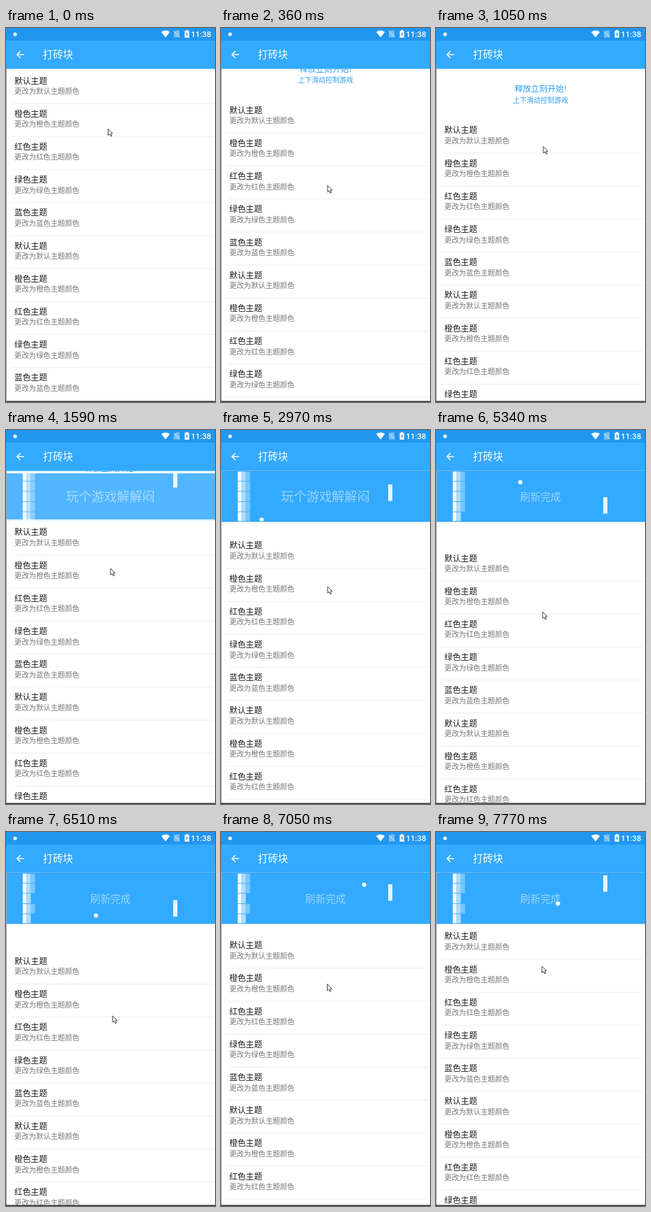
An HTML page with a canvas for the animation above (7.8 s loop, 300x535 px).

```html
<!DOCTYPE html>
<html lang="zh-CN">
<head>
<meta charset="utf-8">
<title>打砖块</title>
<style>
html, body { margin: 0; width: 100%; height: 100%; overflow: hidden; background: #fff; }
canvas { display: block; width: 300px; height: 535px; }
</style>
</head>
<body>
<canvas id="stage"></canvas>
<script>
const W = 300, H = 535, LOOP = 7800;
const canvas = document.getElementById('stage');
const ctx = canvas.getContext('2d');
const dpr = window.devicePixelRatio || 1;
canvas.width = W * dpr;
canvas.height = H * dpr;

const CJK = '"Noto Sans CJK SC", "Noto Sans CJK", "Noto Sans", sans-serif';
const BLUE = '#33aaff';
const TOP = 58.5, HEAD = 73, ROW = 47.2;
const THEMES = ['默认', '橙色', '红色', '绿色', '蓝色'];

// [time, list offset]
const PULL = [[0, 0], [640, 75], [820, 71], [1750, 71], [2900, 90], [4080, 90],
  [4320, 103], [4900, 107.5], [6510, 109.5], [6600, 109], [7270, 76], [7770, 74]];
// [time, x, y]
const POINTER = [[0, 146.5, 144], [640, 158, 288], [1050, 154, 169.5],
  [1590, 150, 198], [1750, 152, 186], [2970, 153, 224], [6510, 153, 263], [7770, 152, 193]];

// Ball bounces inside this box at constant speed
const BALL = { start: 1700, t: 4320, x: 217, y: 101, v: 0.1417,
  left: 42.1, right: 241.3, top: 59.5, bottom: 129.7 };
const HITS = [[3086, 4], [5897, 2]]; // [time, row] in the outer column
const OPEN = 1100, OPEN_MS = 615, DONE = 3700;

const clamp = v => Math.max(0, Math.min(1, v));

function track(keys, t, col = 1) {
  let i = 1;
  while (i < keys.length - 1 && t > keys[i][0]) i++;
  const a = keys[i - 1], b = keys[i];
  return a[col] + (b[col] - a[col]) * clamp((t - a[0]) / (b[0] - a[0]));
}

// Folds an endless straight path into a back-and-forth one
function bounce(start, dist, lo, hi) {
  const span = hi - lo, period = 2 * span;
  const p = (((start - lo + dist) % period) + period) % period;
  return lo + (p < span ? p : period - p);
}

function rect(x, y, w, h, color) {
  ctx.fillStyle = color;
  ctx.fillRect(x, y, w, h);
}

function text(str, x, y, size, color, { align = 'left', weight = 400, family = CJK } = {}) {
  ctx.font = `${weight} ${size}px ${family}`;
  ctx.textAlign = align;
  ctx.textBaseline = 'alphabetic';
  ctx.fillStyle = color;
  ctx.fillText(str, x, y + size * 0.38);
}

function path(points, close) {
  ctx.beginPath();
  points.forEach(([x, y], i) => i ? ctx.lineTo(x, y) : ctx.moveTo(x, y));
  if (close) ctx.closePath();
}

function disc(x, y, r, color) {
  ctx.beginPath();
  ctx.arc(x, y, r, 0, Math.PI * 2);
  ctx.fillStyle = color;
  ctx.fill();
}

function drawList(offset) {
  for (let i = 0; i < 10; i++) {
    const name = THEMES[i % 5], y = 75 + offset + i * ROW;
    text(name + '主题', 12, y, 11.8, '#1c1c1c', { weight: 500 });
    text(`更改为${name}主题颜色`, 12, y + 15, 10.4, '#777');
    rect(8, y + 32.5, 290, 1, '#f0f0f0');
  }
}

function drawGame(t, offset) {
  rect(0, 0, W, HEAD, BLUE);
  const done = t >= DONE;
  text(done ? '刷新完成' : '玩个游戏解解闷', 150, 36.5, done ? 14.6 : 18.2,
    'rgba(255,255,255,.5)', { align: 'center' });

  const h = HEAD / 5;
  for (let row = 0; row < 5; row++) {
    for (let col = 0; col < 3; col++) {
      if (col === 2 && HITS.some(([at, r]) => r === row && t >= at)) continue;
      rect(24 + col * 6, row * h + 0.5, 5.6, h - 0.8, `rgba(255,255,255,${[0.95, 0.6, 0.33][col]})`);
    }
  }
  rect(240, offset - 12 - TOP, 6, 23.5, 'rgba(255,255,255,.88)');

  if (t >= BALL.start) {
    const d = (t - BALL.t) * BALL.v;
    disc(bounce(BALL.x, d, BALL.left, BALL.right),
      bounce(BALL.y, d * Math.tan(Math.PI / 6), BALL.top, BALL.bottom) - TOP, 3, '#fff');
  }
  rect(0, 0, W, 1, '#2389da');
  rect(0, HEAD - 1, W, 1, '#2b9aec');
}

function drawMask(t) {
  const p = clamp((t - OPEN) / OPEN_MS);
  if (p >= 1) return;
  const open = (1 - Math.cos(Math.PI * p)) / 2;
  const half = HEAD / 2, shift = half * open;
  rect(0, 0, W, HEAD, `rgba(255,255,255,${Math.min(1, (1 - open) * 1.5)})`);
  rect(0, -shift, W, half, '#fff');
  rect(0, half + shift, W, half, '#fff');
  text('释放立刻开始!', 150, 28.5 - shift, 11.8, '#2c9ff0', { align: 'center' });
  text('上下滑动控制游戏', 150, 44.5 + shift, 9.9, '#2c9ff0', { align: 'center' });
}

function drawHeader(t, offset) {
  ctx.save();
  ctx.beginPath();
  ctx.rect(0, TOP, W, Math.min(HEAD, offset));
  ctx.clip();
  ctx.translate(0, TOP + (t < OPEN ? Math.min(0, offset - 71) : 0));
  if (t > OPEN) drawGame(t, offset);
  drawMask(t);
  ctx.restore();
}

function drawBars() {
  rect(0, 0, W, 18, '#2196ef');
  rect(0, 18, W, TOP - 18, BLUE);
  text('打砖块', 53, 38, 14.4, '#fff', { weight: 500 });

  ctx.strokeStyle = '#fff';
  ctx.lineWidth = 1.4;
  path([[26, 38], [16, 38]]);
  ctx.stroke();
  path([[20.8, 33], [15.8, 38], [20.8, 43]]);
  ctx.stroke();

  disc(13, 9, 2.6, '#fff');

  // Wi-Fi fan
  ctx.fillStyle = '#fff';
  ctx.beginPath();
  ctx.moveTo(229, 13.5);
  ctx.lineTo(222.8, 5.7);
  ctx.quadraticCurveTo(229, 1.2, 235.2, 5.7);
  ctx.fill();

  // Missing SIM
  ctx.fillStyle = 'rgba(255,255,255,.4)';
  path([[241, 6], [244, 3.5], [249, 3.5], [249, 13.5], [241, 13.5]], true);
  ctx.fill();
  ctx.strokeStyle = 'rgba(255,255,255,.7)';
  ctx.lineWidth = 1;
  path([[240.5, 4], [249.5, 13]]);
  ctx.stroke();

  // Battery
  rect(256.5, 4, 6.5, 9.8, '#fff');
  rect(258.5, 2.8, 2.5, 1.5, '#fff');
  path([[260.4, 5.5], [258, 9.3], [259.5, 9.3], [259.2, 12.2], [261.6, 8.4], [260.1, 8.4]], true);
  ctx.fillStyle = '#2196ef';
  ctx.fill();

  text('11:38', 294.5, 9, 11.4, '#fff', { align: 'right', weight: 500, family: 'Roboto, sans-serif' });
}

function drawPointer(t, offset) {
  const x = track(POINTER, t);
  const y = t > 1750 ? 44 + 2 * offset : track(POINTER, t, 2);
  ctx.save();
  ctx.translate(x, y);
  path([[0, 0], [0, 9.3], [2.2, 7.5], [3.8, 10.8], [5.4, 10.1], [3.9, 6.9], [6.6, 6.7]], true);
  ctx.fillStyle = '#fff';
  ctx.fill();
  ctx.strokeStyle = '#444';
  ctx.lineWidth = 1;
  ctx.stroke();
  ctx.restore();
}

function draw(t) {
  const offset = track(PULL, t);
  ctx.setTransform(dpr, 0, 0, dpr, 0, 0);
  rect(0, 0, W, H, '#fff');
  drawList(offset);
  drawHeader(t, offset);
  drawBars();
  rect(0, TOP, 1, H - TOP, '#b0b0b0');
  rect(0, 533.5, W, 1.5, '#3a3a3a');
  drawPointer(t, offset);
}

const begin = performance.now();
function tick() {
  draw((performance.now() - begin) % LOOP);
  requestAnimationFrame(tick);
}
tick();
</script>
</body>
</html>
```
